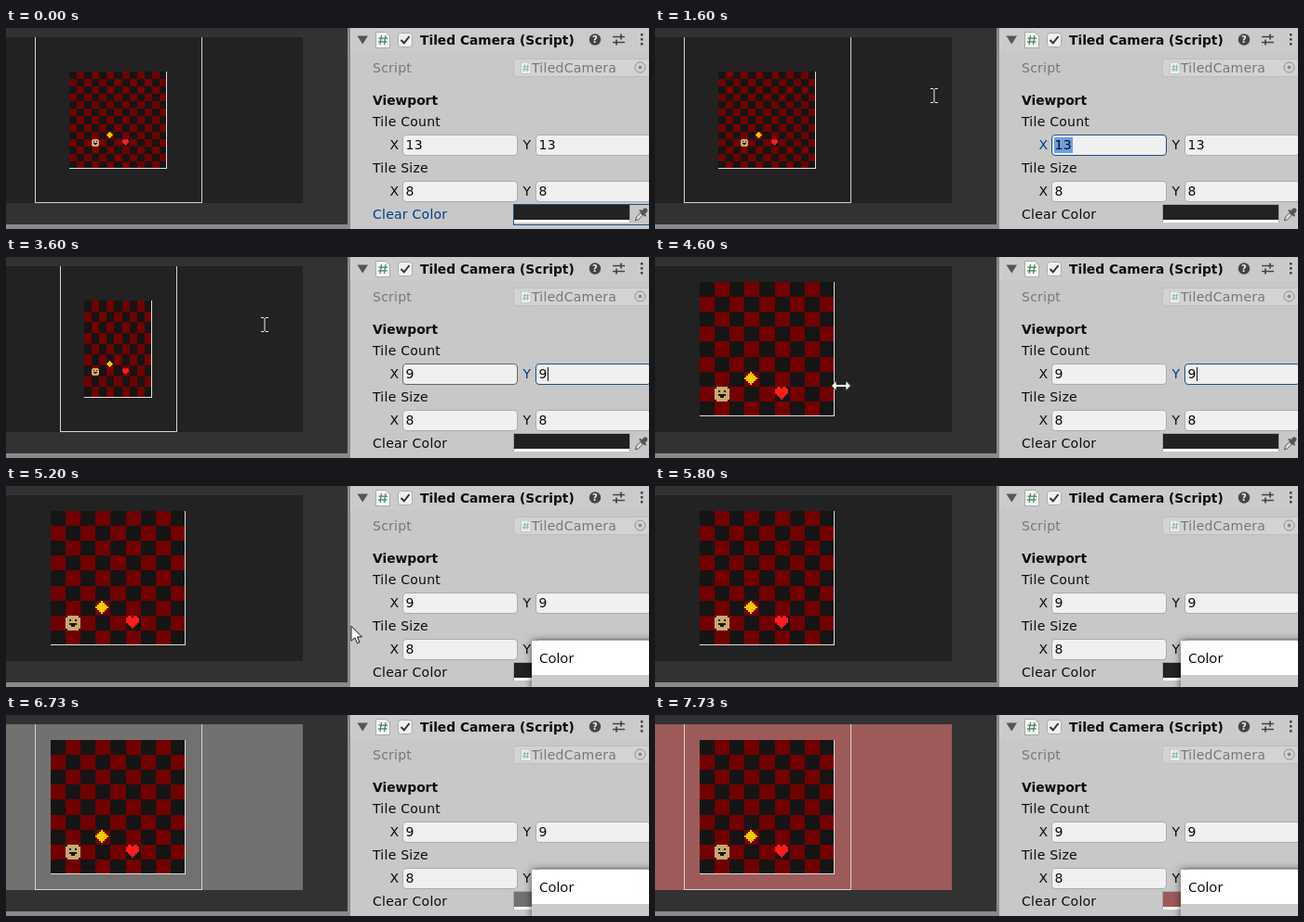
Recreate the animation shown at these times as an HTML page with a canvas. Size 691 by 217 pixels, loop 8 s.

```html
<!DOCTYPE html>
<html lang="en">
<head>
<meta charset="utf-8">
<title>Tiled Camera</title>
<style>
html, body { margin: 0; width: 691px; height: 217px; overflow: hidden; background: #323232; }
canvas, svg { position: absolute; left: 0; top: 0; display: block; }
text { font: 14px 'DejaVu Sans', sans-serif; letter-spacing: .25px; fill: #0c0c0c; white-space: pre; }
text.bold { font-size: 13.8px; font-weight: 700; letter-spacing: 0; }
text.dim { fill: #777; }
text.on { fill: #003c88; }
.field { fill: #f0f0f0; stroke: #ababab; }
.field.hover { stroke: #666; }
.field.on { stroke: #1d5087; }
.crisp { shape-rendering: crispEdges; }
#popup .sheet { filter: drop-shadow(0 0 4px rgba(0, 0, 0, .6)); }
</style>
</head>
<body>
<canvas id="view" width="370" height="217"></canvas>
<svg width="691" height="217" viewBox="0 0 691 217">
  <g class="crisp">
    <path d="M0 212H367V0H370V217H0Z" fill="#8a8a8a"/>
    <path d="M370 0H691V217H370Z" fill="#c8c8c8"/>
    <path d="M370 0H691V26H370Z" fill="#cbcbcb"/>
  </g>

  <path d="M377.500 8.500H389L383.250 17.500Z" fill="#555"/>
  <path d="M397.500 4.500H408L412.500 9V21.500H397.500Z" fill="#f4f4f4" stroke="#aaa"/>
  <path d="M403.500 8L402 18M408 8L406.500 18M400.500 11.200H410M400 14.800H409.500" stroke="#3f8259" stroke-width="1.200" fill="none"/>
  <rect class="field" x="421.500" y="5.500" width="15" height="15" rx="3"/>
  <path d="M424.500 13L427.800 16.300L433.500 9" fill="none" stroke="#333" stroke-width="2"/>
  <text class="bold" x="445" y="18">Tiled Camera (Script)</text>
  <circle cx="633" cy="12.500" r="6.200" fill="#444"/>
  <text x="633" y="16.300" text-anchor="middle" style="font-size:10px;font-weight:700;letter-spacing:0;fill:#eee">?</text>
  <path d="M652 9.500H665M652 15.500H665M661 6.500V12.500M656 12.500V18.500" stroke="#444" stroke-width="1.700"/>
  <path d="M682 6h2.500v2.500H682zM682 11h2.500v2.500H682zM682 16h2.500v2.500H682z" fill="#444"/>

  <text class="dim" x="394" y="48">Script</text>
  <rect x="545.500" y="33.500" width="160" height="19" rx="3" fill="#d3d3d3" stroke="#bdbdbd"/>
  <path d="M553.500 37H561L564 40V49.500H553.500Z" fill="#eee" stroke="#c4c4c4"/>
  <path d="M557.600 39.500L556.800 47M560.800 39.500L560 47M555.500 41.800H562.500M555 44.800H562" stroke="#8bb79d" fill="none"/>
  <text class="dim" x="565" y="48">TiledCamera</text>
  <circle cx="681.500" cy="42.500" r="5.500" fill="none" stroke="#8a8a8a"/>
  <circle cx="681.500" cy="42.500" r="2" fill="#8a8a8a"/>

  <text class="bold" x="394" y="83">Viewport</text>
  <text x="394" y="106">Tile Count</text>
  <text x="394" y="156">Tile Size</text>
  <g id="fields"></g>

  <text id="colorLabel" x="394" y="206">Clear Color</text>
  <g class="crisp">
    <rect x="545" y="190" width="126" height="20" fill="#aaa"/>
    <rect id="swatch" x="546" y="191" width="124" height="16"/>
    <rect x="546" y="207" width="124" height="3" fill="#fff"/>
    <path id="colorFocus" d="M691 190.500H545.500V212.500H691" fill="none" stroke="#1d5087"/>
  </g>
  <g stroke="#555" stroke-linecap="round">
    <path d="M676.500 207.500L677.500 204L683 198.500L685.500 201L680 206.500Z" fill="#ddd"/>
    <path d="M681.500 197L687 202.500" stroke-width="2"/>
    <path d="M684.500 199.500L687 197" stroke-width="5"/>
  </g>

  <g id="popup">
    <g class="sheet">
      <path class="crisp" d="M565 167H699V225H565Z" fill="#cbcbcb"/>
    </g>
    <path class="crisp" d="M565 167H691V204H565Z" fill="#fff"/>
    <text x="573" y="191" style="font:15px 'Open Sans',sans-serif;letter-spacing:0;fill:#000">Color</text>
  </g>
  <g id="cursor" stroke-linejoin="round">
    <path d="M-4 -7.500H-1L0 -6.500L1 -7.500H4M0 -6.500V6.500M-4 7.500H-1L0 6.500L1 7.500H4" fill="none" stroke="#eee"/>
    <path d="M-10.500 0L-5 -5.500V-1.500H5V-5.500L10.500 0L5 5.500V1.500H-5V5.500Z" fill="#fff" stroke="#111" stroke-width=".8"/>
    <path d="M0 0V16L4 12.500L6.500 18.500L9 17.400L6.500 11.700H11.500Z" fill="#fff" stroke="#111"/>
  </g>
</svg>
<script>
const LOOP = 8000, STEP = 1000 / 15;
const $ = id => document.getElementById(id);
const ctx = $('view').getContext('2d');
const DARK = [34, 34, 34], GREY = [114, 113, 112], ROSE = [156, 91, 90];

// moments at which the counts are typed and the camera adapts
const X_TYPED = 2530, Y_TYPED = 2930, RESIZED = 3660;

// col and row count from the bottom left of the 9 x 9 board
const sprites = [
  { col: 1, row: 1, color: '#c9a96f', rows: ['.######.', '########', '##.##.##', '########', '##....##', '###..###', '########', '.######.'] },
  { col: 3, row: 2, color: '#f6c800', rows: ['...#', '..###', '.#####', '#######', '.#####', '..###', '...#'] },
  { col: 5, row: 1, color: '#ff1c1c', rows: ['.##.##', '#######', '#######', '#######', '.#####', '..###', '...#'] }
];

// time, x, y
const path = [
  [733, 330, 235], [1000, 203, 150], [1333, 312, 75], [1600, 300, 73], [3590, 300, 73],
  [3600, 278, 73], [3733, 262, 73], [3933, 258, 70], [4267, 22, 28], [4600, 200, 139],
  [4733, 262, 152], [5333, 402, 151], [5600, 404, 154], [5800, 480, 225]
];

const lerp = (a, b, k) => a + (b - a) * k;
const ramp = (t, a, b) => Math.min(1, Math.max(0, (t - a) / (b - a)));
const mix = (a, b, k) => a.map((v, i) => Math.round(lerp(v, b[i], k)));
const rgb = c => `rgb(${c})`;
const countX = t => t < X_TYPED ? 13 : 9;
const countY = t => t < Y_TYPED ? 13 : 9;

function rect(color, x, y, w, h) {
  ctx.fillStyle = color;
  ctx.fillRect(x, y, w, h);
}

function field(label, x, y, value, mode, hover) {
  const on = mode ? 'on' : '';
  return `<text class="${on}" x="${x - 13.5}" y="${y + 16}">${label}</text>
    <rect class="field ${hover ? 'hover' : ''} ${on}" x="${x + .5}" y="${y + .5}" width="123" height="22" rx="3.5"/>
    ${mode === 'select' ? `<rect x="${x + 3}" y="${y + 3}" width="20" height="17" fill="#6c9fe3"/>` : ''}
    <text x="${x + 3.5}" y="${y + 16}">${value}</text>
    ${mode === 'caret' ? `<path class="crisp" d="M${x + 13.5} ${y + 4}v15" stroke="#111"/>` : ''}`;
}

// the frame, in tiles, follows the typed counts with a delay
function boardAt(t) {
  if (t < Y_TYPED) return { x: 68, y: 47, cols: 13, rows: 13, size: 1, dx: 2, dy: 2 };
  if (t < RESIZED) return { x: 84, y: 47, cols: 9, rows: 13, size: 1, dx: 0, dy: 2 };
  return { x: 48, y: 27, cols: 9, rows: 9, size: 2, dx: 0, dy: 0 };
}

function drawView(t, clear) {
  const { x, y, cols, rows, size, dx, dy } = boardAt(t);
  const w = cols * 8 * size + 1, h = rows * 8 * size + 1;
  const left = (i, n) => x + Math.round(i * w / n), top = (i, n) => y + Math.round(i * h / n);
  rect('#323232', 0, 0, 370, 217);
  rect(rgb(clear), 0, 10, 319, 179);
  if (t < RESIZED || t >= 6460) {
    const narrow = t >= Y_TYPED && t < RESIZED, x0 = narrow ? 58 : 31, x1 = narrow ? 183 : 210;
    rect('#d4d4d4', x0, 10, 1, 179);
    rect('#d4d4d4', x1, 10, 1, 179);
    rect('#d4d4d4', x0, 188, x1 - x0, 1);
  }
  const nx = countX(t), ny = countY(t);
  for (let r = 0; r < ny; r++)
    for (let c = 0; c < nx; c++) {
      const cx = left(c, nx), cy = top(r, ny);
      rect((r + c) % 2 ? '#720000' : '#151515', cx, cy, left(c + 1, nx) - cx, top(r + 1, ny) - cy);
    }
  for (const s of sprites) {
    const sx = left(s.col + dx, cols), sy = top(rows - 1 - s.row - dy, rows);
    s.rows.forEach((line, j) => [...line].forEach((ch, i) => {
      if (ch === '#') rect(s.color, sx + i * size, sy + j * size, size, size);
    }));
  }
  rect('#e0e0e0', x + w - 1, y, 1, h);
  rect('#e0e0e0', x, y + h - 1, w, 1);
}

function drawPanel(t) {
  const xMode = t >= 1460 && t < X_TYPED ? 'select' : t >= X_TYPED && t < 2660 ? 'caret' : '';
  const yMode = t >= 2660 && t < Y_TYPED ? 'select' : t >= Y_TYPED && t < 5130 ? 'caret' : '';
  const hover = t >= 1330 && t < RESIZED;
  $('fields').innerHTML =
    field('X', 426, 115, countX(t), xMode, hover) + field('Y', 569, 115, countY(t), yMode) +
    field('X', 426, 165, 8) + field('Y', 569, 165, 8);
  const picked = t < 1460;
  $('colorLabel').classList.toggle('on', picked);
  $('colorFocus').style.display = picked ? '' : 'none';
  $('popup').style.display = t >= 5200 ? '' : 'none';
}

function drawCursor(t) {
  const shown = t >= 800 && t < 5790;
  $('cursor').style.display = shown ? '' : 'none';
  if (!shown) return;
  const i = path.findIndex(p => p[0] > t), a = path[i - 1], b = path[i];
  const k = ramp(t, a[0], b[0]);
  $('cursor').setAttribute('transform', `translate(${lerp(a[1], b[1], k)} ${lerp(a[2], b[2], k)})`);
  const kind = t < 1200 || t >= 4790 ? 2 : t < 3930 ? 0 : 1;
  [...$('cursor').children].forEach((el, n) => el.style.display = n === kind ? '' : 'none');
}

let last = -1;
function frame(now) {
  const tick = Math.floor((now % LOOP + 5) / STEP) % (LOOP / STEP);
  if (tick !== last) {
    last = tick;
    const t = tick * STEP + .01;
    const grey = mix(DARK, GREY, ramp(t, 6400, 6733));
    const clear = mix(grey, ROSE, t < 6990 ? 0 : t < 7130 ? .5 : .95);
    drawView(t, t < 7730 ? clear : ROSE);
    drawPanel(t);
    $('swatch').setAttribute('fill', rgb(mix(clear, ROSE, ramp(t, 7200, 7733))));
    drawCursor(t);
  }
  requestAnimationFrame(frame);
}
requestAnimationFrame(frame);
</script>
</body>
</html>
```
